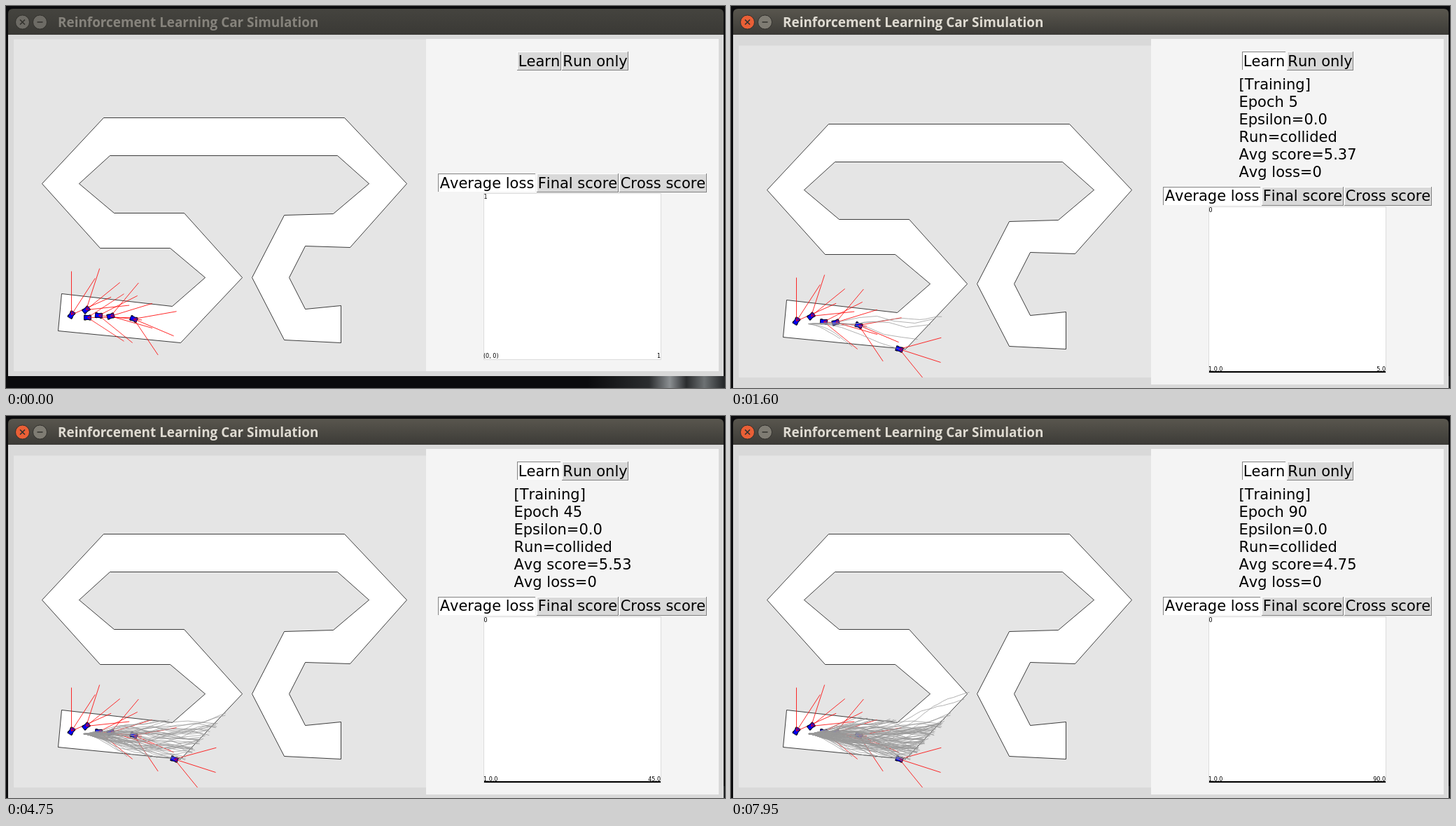
Animation, 1027 px wide and 545 px high, one loop 8 s. Source, as an HTML page:

```html
<!DOCTYPE html>
<html lang="en">
<head>
<meta charset="utf-8">
<title>Car simulation</title>
<style>
  html, body { margin: 0; width: 100%; height: 100%; overflow: hidden; background: #0b0b0d; }
  svg { display: block; width: 1027px; height: 545px; }
  text { font: 21px "DejaVu Sans", sans-serif; font-kerning: none; fill: #000; white-space: pre; }
  .small text { font-size: 8px; }
  .mid { text-anchor: middle; }
  .end { text-anchor: end; }
  .line { fill: none; stroke-width: .75; }
  .frame, .btn path, .btn rect { shape-rendering: crispEdges; }

  .bar { fill: url(#barOff); }
  .title { font: 700 18.9px "Open Sans", "Noto Sans", sans-serif; fill: #86837c; }
  .knob { fill: #6d6b65; stroke: #33322e; }
  .focus .bar { fill: url(#barOn); }
  .focus .title { fill: #dfdbd2; }
  .focus .knob { fill: #7f7c73; }
  .focus .close { fill: #ea5f36; }
  .sign { stroke: #33322e; stroke-width: 1.7; fill: none; }

  .btn rect { fill: #d9d9d9; }
  .btn path { fill: none; stroke: #fff; }
  .btn .low { stroke: #828282; }
  .btn.on rect { fill: #fff; }
  .btn.on path { stroke: #828282; }
  .btn.on .low { stroke: #f4f4f4; }

  .trail { stroke: #989898; }
  .ray { stroke: #f00; }
</style>
</head>
<body>
<svg id="stage" viewBox="0 0 1027 545">
  <defs>
    <linearGradient id="barOff" x2="0" y2="1">
      <stop stop-color="#45443f"/><stop offset="1" stop-color="#3a3935"/>
    </linearGradient>
    <linearGradient id="barOn" x2="0" y2="1">
      <stop stop-color="#59564e"/><stop offset="1" stop-color="#3c3b37"/>
    </linearGradient>
    <linearGradient id="glow">
      <stop stop-color="#0b0b0d"/><stop offset=".45" stop-color="#2b2d2f"/>
      <stop offset=".6" stop-color="#8b8f92"/><stop offset=".72" stop-color="#2a2c2e"/>
      <stop offset=".85" stop-color="#6d7173"/><stop offset="1" stop-color="#222426"/>
    </linearGradient>
    <clipPath id="field"><rect x="11" y="47.500" width="589" height="473.500"/></clipPath>
  </defs>

  <rect width="1027" height="545" fill="#0b0b0d"/>
  <rect x="830" y="528" width="197" height="17" fill="url(#glow)"/>

  <g id="win">
    <path class="bar" d="M3 41V11q0-7 7-7H1018q7 0 7 7V41z"/>
    <rect id="body" x="3" y="41" width="1022" fill="#d9d9d9"/>
    <circle class="knob close" cx="23.5" cy="23" r="10"/>
    <circle class="knob" cx="48.5" cy="23" r="10"/>
    <path class="sign" d="M20 19.5l7 7m0-7l-7 7M44.500 23h8"/>
    <text class="title" x="74" y="30">Reinforcement Learning Car Simulation</text>
  </g>

  <g id="arena">
    <g clip-path="url(#field)">
      <rect x="11" y="47" width="589" height="474" fill="#e5e5e5"/>
      <g transform="translate(.5 .5)">
        <polygon class="line" style="fill:#fff" stroke="#000" points="79,410 237,428 284,387 234,345 134,345 51,253 139,159 483,159 572,253 491,344 427,342 404,387 427,432 478,427 478,480 397,476 351,387 397,298 467,296 518,253 473,213 148,213 104,253 154,295 254,295 337,387 249,480 74,463"/>
        <g id="cars"></g>
        <g id="trails"></g>
      </g>
    </g>
  </g>

  <rect id="panel" x="600" y="47" width="418" fill="#f4f4f4"/>
  <g id="modes"></g>
  <g id="info"></g>
  <g id="tabs"></g>
  <g id="plot">
    <rect class="frame" x="682.500" y="267.500" width="253" height="237" fill="#fff" stroke="#dcdcdc"/>
    <path id="axis" d="M683 503H935" stroke="#000" stroke-width="2"/>
    <g class="small">
      <text id="top" x="682.500" y="275"></text>
      <text id="origin" x="682" y="501.500"></text>
      <text id="right" class="end" x="935" y="501.500"></text>
    </g>
  </g>
  <path id="cursor" d="M0 0V22.500L5 17.800L8.600 26.500L12.400 24.900L8.800 16.400H15.500Z" fill="#fff" stroke="#222" stroke-width="1.2"/>
</svg>

<script>
const LOOP = 8000, CLICK = 750, DRIVEN = 1150, FAST = 1400, RUN = 76, RUNS = 91;
const RAD = Math.PI / 180;
const $ = id => document.getElementById(id);
const set = (el, attrs) => { for (const k in attrs) el.setAttribute(k, attrs[k]); return el; };
const add = (parent, tag, attrs) =>
  parent.appendChild(set(document.createElementNS('http://www.w3.org/2000/svg', tag), attrs));
const shift = (id, x, y) => $(id).setAttribute('transform', `translate(${x} ${y})`);
const write = (el, s) => { if (el.textContent !== s) el.textContent = s; };

function button(parent, text, x, y, w, on) {
  const g = add($(parent), 'g', { class: on ? 'btn on' : 'btn' }), h = 27;
  add(g, 'rect', { x, y, width: w, height: h });
  add(g, 'path', { d: `M${x + .5} ${y + h}V${y + .5}H${x + w}` });
  add(g, 'path', { class: 'low', d: `M${x} ${y + h - .5}H${x + w - .5}V${y}` });
  add(g, 'text', { class: 'mid', x: x + w / 2, y: y + 20.5 }).textContent = text;
  return g;
}
const learn = button('modes', 'Learn', 730, 65, 63);
button('modes', 'Run only', 794, 65, 95);
button('tabs', 'Average loss', 617, 239, 140, true);
button('tabs', 'Final score', 758, 239, 117);
button('tabs', 'Cross score', 876, 239, 125);

const lines = Array.from({ length: 6 }, (_, i) => add($('info'), 'text', { y: 119 + i * 25 }));

// A car with three distance sensors
function car(x, y, deg) {
  const g = add($('cars'), 'g', {});
  for (const wx of [-5, 2]) for (const wy of [-4, 2])
    add(g, 'rect', { x: wx, y: wy, width: 3, height: 2 });
  add(g, 'rect', { x: -5, y: -3, width: 10, height: 6, fill: '#00f', stroke: '#003' });
  for (const a of [-33, 0, 33])
    add(g, 'path', { class: 'line ray', d: `M0 0L${62 * Math.cos(a * RAD)} ${62 * Math.sin(a * RAD)}` });
  return place(g, x, y, deg);
}
const place = (g, x, y, deg) => set(g, { transform: `translate(${x} ${y}) rotate(${deg})` });
car(93, 440, -57);
car(114, 433, -39);
const mover = car(116, 444, 0);
car(132, 441, 6);
car(149, 442, -17);
car(182, 446, 23);

let seed = 4271;
const random = () => (seed = seed * 16807 % 2147483647) / 2147483647;

const onRoad = (x, y) =>
  y > Math.min(410 + .108 * (x - 79), 428 - .872 * (x - 237)) &&
  y < 463 + .097 * (x - 74) &&
  x < 337 - .946 * (y - 387);

// Random steering that tends back to straight ahead, until a wall is hit
function wander() {
  const pts = [[110, 444]];
  let x = 110, y = 444, a = 2;
  while (onRoad(x, y)) {
    a = 2 + (a - 2) * .87 + (Math.floor(random() * 3) - 1) * 9;
    x += 8 * Math.cos(a * RAD);
    y += 8 * Math.sin(a * RAD);
    pts.push([x, y]);
  }
  return pts;
}

const paths = [
  [[116, 444], [134, 444], [157, 449], [184, 459], [212, 471], [240, 480]],
  [[110, 444], [150, 442], [183, 435], [208, 433], [232, 440], [262, 443], [289, 437]],
  [[110, 444], [160, 446], [200, 441], [225, 442], [250, 449], [284, 445]],
  [[110, 444], [160, 444], [195, 449], [218, 459], [243, 463], [266, 466]]
];
while (paths.length < RUNS) paths.push(wander());
const trails = paths.map(() => add($('trails'), 'polyline', { class: 'line trail' }));

// The first part p of a path, 0 to 1
function part(pts, p) {
  if (p <= 0) return [];
  if (p >= 1) return pts;
  const u = p * (pts.length - 1), i = Math.floor(u), f = u - i;
  const [a, b] = [pts[i], pts[i + 1]];
  return [...pts.slice(0, i + 1), [a[0] + (b[0] - a[0]) * f, a[1] + (b[1] - a[1]) * f]];
}

function progress(k, t) {
  if (k === 0) return (t - CLICK) / (DRIVEN - CLICK);
  if (k < 4) return (t - DRIVEN) / 83 - k + 1;
  return (t - FAST) / RUN - k + 4;
}

function drive(t) {
  const pts = part(paths[0], progress(0, t)), n = pts.length;
  if (n < 2) return place(mover, 116, 444, 0);
  const [a, b] = [pts[n - 2], pts[n - 1]];
  place(mover, b[0], b[1], Math.atan2(b[1] - a[1], b[0] - a[0]) / RAD);
}

const moves = [[500, 775, -28], [CLICK, 762, 78], [CLICK + 60, 762, 78], [1300, 185, 18], [FAST, 185, 18], [1600, 160, -30]];
function point(t) {
  const i = moves.findIndex(m => m[0] > t);
  if (i < 1) return shift('cursor', 0, -60);
  const [a, b] = [moves[i - 1], moves[i]], f = (t - a[0]) / (b[0] - a[0]), e = f * f * (3 - 2 * f);
  shift('cursor', a[1] + (b[1] - a[1]) * e, a[2] + (b[2] - a[2]) * e);
}

const scores = [5.37, 5.31, 5.24, 5.18, 5.21, 5.3, 5.38, 5.46, 5.53, 5.37, 5.2, 5.02, 4.84, 4.79, 4.81, 4.77, 4.76, 4.75];

function report(t) {
  const count = Math.floor(Math.max(0, 4 + (t - FAST) / RUN) / 5);
  const epoch = count * 5, big = count > 0;
  const rows = t < CLICK ? [] : ['[Training]'];
  if (big) rows.push(`Epoch ${epoch}`, 'Epsilon=0.0', 'Run=collided',
    `Avg score=${scores[count - 1].toFixed(2)}`, 'Avg loss=0');
  lines.forEach((el, i) => {
    el.setAttribute('x', big ? 725.5 : 757.5);
    write(el, rows[i] || '');
  });
  write($('top'), big ? '0' : '1');
  write($('origin'), big ? '1.0,0' : '(0, 0)');
  write($('right'), big ? epoch + '.0' : '1');
  $('axis').style.display = big ? '' : 'none';
  $('body').setAttribute('height', big ? 504 : 487);
  $('panel').setAttribute('height', big ? 493 : 474);
  shift('arena', 0, big ? 9 : 0);
  shift('tabs', 0, big ? 18.5 : 0);
  shift('plot', 0, big ? 19 : 0);
}

let start;
function frame(now) {
  start ??= now;
  const t = (now - start) % LOOP, active = t >= CLICK;
  $('win').setAttribute('class', active ? 'focus' : '');
  learn.setAttribute('class', active ? 'btn on' : 'btn');
  report(t);
  drive(t);
  trails.forEach((el, k) => {
    const pts = part(paths[k], progress(k, t)).map(p => p.map(v => v.toFixed(1))).join(' ');
    if (el.getAttribute('points') !== pts) el.setAttribute('points', pts);
  });
  point(t);
  requestAnimationFrame(frame);
}
requestAnimationFrame(frame);
</script>
</body>
</html>
```
